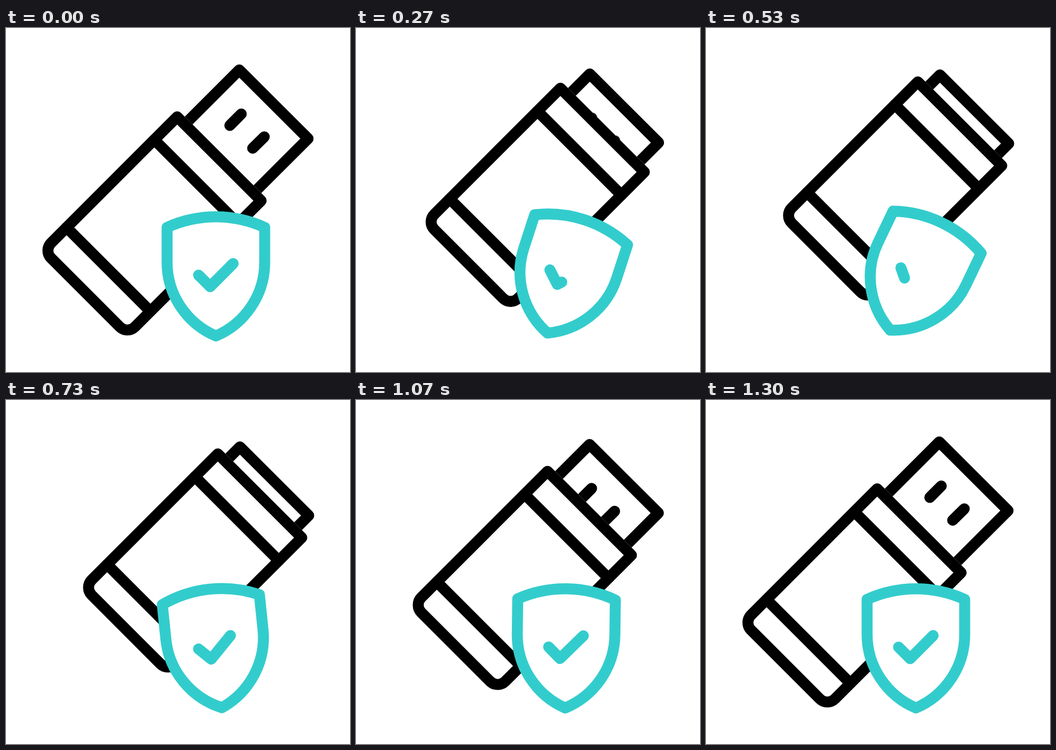
These frames come from a looping animation (640 px wide and 640 px high, 1670 ms). An HTML page:

```html
<!DOCTYPE html>
<html lang="en">
<head>
<meta charset="utf-8">
<title>Secure USB drive</title>
<style>
  html, body { margin: 0; width: 100%; height: 100%; overflow: hidden; background: #fff; }
  svg { display: block; width: 100vw; height: 100vh; }
  .line { fill: none; stroke: #000; stroke-width: 20.4; stroke-linecap: round; stroke-linejoin: round; }
  .under { fill: #fff; stroke: #fff; }
  .teal { stroke: #3cc; }
  #shield path:first-child { fill: #fff; }
</style>
</head>
<body>
<svg viewBox="0 0 640 640">
  <defs>
    <path id="case" d="M318.5 165.2 474.7 321.2 239.8 556.1A19.8 19.8 0 0 1 211.8 556.1L83.8 428A19.8 19.8 0 0 1 83.8 399.9Z"/>
  </defs>
  <g id="plug" class="line">
    <path d="M300 212 434 78 562 205.7 428 339.7"/>
    <path d="M416.4 181.2 437.7 159.9M458.9 223.7 480.5 202.4"/>
  </g>
  <g id="body" class="line">
    <use href="#case" class="under"/>
    <use href="#case"/>
    <path d="M275.9 207.9 431.9 363.9M112.6 371.1 268.6 527.1"/>
  </g>
  <g id="shield" class="line teal">
    <path d="M299.7 371A219 219 0 0 1 481.3 371V436C481.3 497 444 550 390.5 573C337 550 299.7 497 299.7 436Z"/>
    <path id="check" pathLength="1" d="M358.3 459.8 379.8 481.2 422.6 438.3"/>
  </g>
</svg>
<script>
  const LOOP = 1670, STEP = 100 / 3, LAST = 39;
  const $ = id => document.getElementById(id);
  const [plug, body, shield, check] = ['plug', 'body', 'shield', 'check'].map($);

  // Each key is [step, value]
  const slide = [[0, 0], [11, 1], [27, 1], [37, 0]];
  const swing = [[0, 0], [14, 29.7], [24, -10], [29.3, 5], [35.3, -5], [39, 0]];
  const trim = [[2.3, 1], [12.8, 0], [23.3, 1]];

  const ease = u => u * u * (3 - 2 * u);

  function valueAt(keys, k) {
    if (k <= keys[0][0]) return keys[0][1];
    for (let i = 1; i < keys.length; i++) {
      const [k0, v0] = keys[i - 1], [k1, v1] = keys[i];
      if (k <= k1) return v0 + (v1 - v0) * ease((k - k0) / (k1 - k0));
    }
    return keys[keys.length - 1][1];
  }

  function shift(el, x, y) {
    el.setAttribute('transform', `translate(${x} ${y})`);
  }

  function draw(t) {
    // 30 steps a second, with delays rounded to 10 ms
    const tick = Math.floor(t / 10) * 10;
    const k = Math.min(LAST, Math.floor((tick + 3.4) / STEP));
    const s = valueAt(slide, k), p = valueAt(trim, k);
    shift(plug, 1.2 * s, 9.2 * s);
    shift(body, 75.6 * s, -65.1 * s);
    shield.setAttribute('transform', `rotate(${valueAt(swing, k)} 390.5 462.5)`);
    check.setAttribute('stroke-dasharray', p < 1 ? `${p} 2` : 'none');
    check.setAttribute('visibility', p > 0.001 ? 'visible' : 'hidden');
  }

  const start = performance.now();
  function loop() {
    draw((performance.now() - start) % LOOP);
    requestAnimationFrame(loop);
  }
  loop();
</script>
</body>
</html>
```
